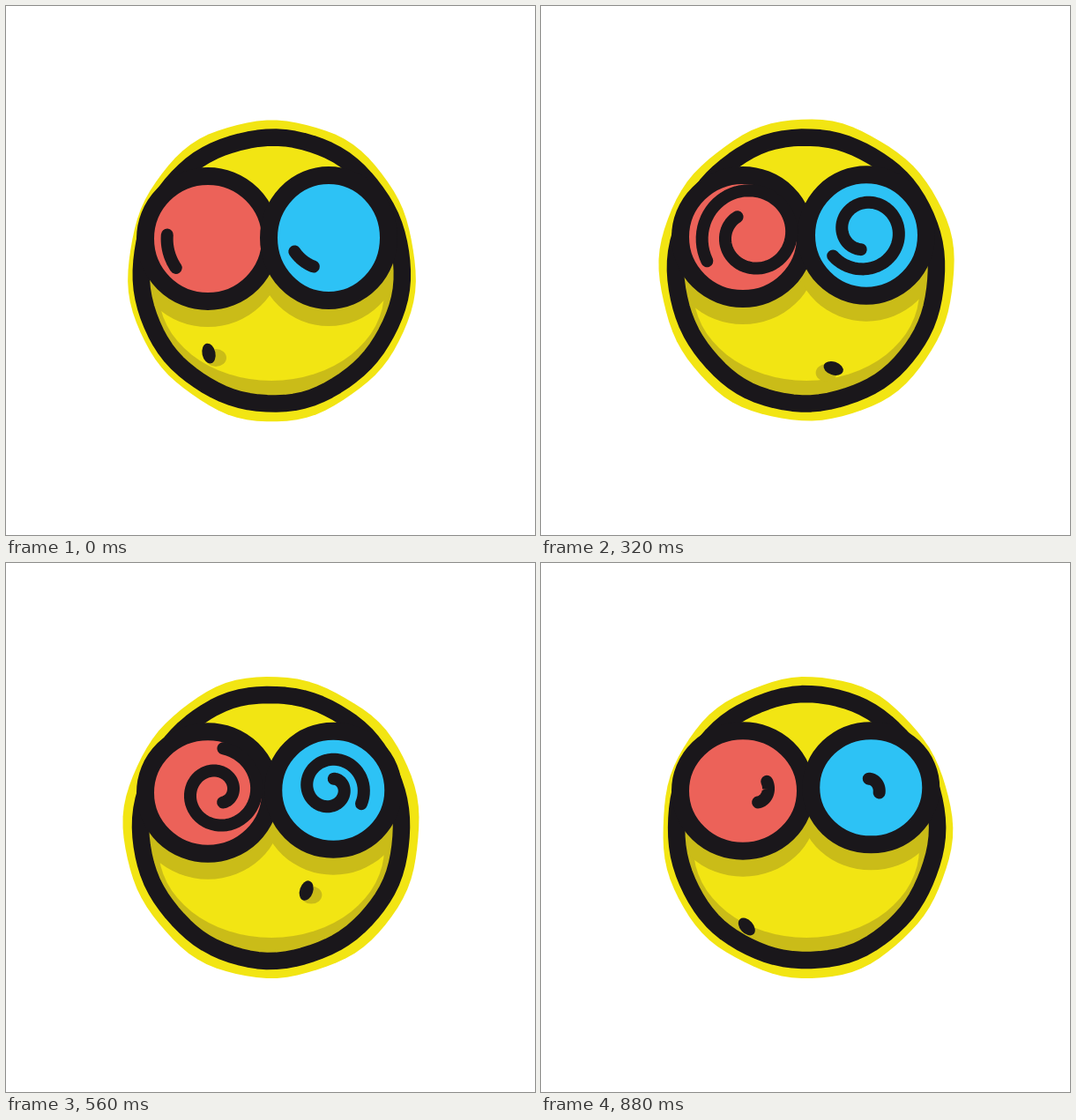
An HTML page with a canvas for the animation above (0.96 s loop, 600 by 600 pixels).

```html
<!DOCTYPE html>
<html lang="en">
<head>
<meta charset="utf-8">
<title>Dizzy face</title>
<style>
  html, body { margin: 0; width: 100%; height: 100%; overflow: hidden; background: #fff; }
  canvas { display: block; width: 600px; height: 600px; }
</style>
</head>
<body>
<canvas id="stage" width="600" height="600"></canvas>
<script>
const ctx = document.getElementById('stage').getContext('2d');
const STEP = 80, STEPS = 12, TAU = Math.PI * 2;
const INK = '#1a171b', YELLOW = '#f2e513', SHADE = '#cabc18', RED = '#ec6259', BLUE = '#2dc2f5';
const { sin, cos, min, max } = Math;
const radians = degrees => degrees * Math.PI / 180;

// Swirls run from the rim inwards; the sweep sign gives the direction.
const leftSwirl = { x: 240, y: 260, outer: 60, inner: 13, angle: 142, sweep: 640 };
const rightSwirl = { x: 368, y: 255, outer: 47, inner: 11, angle: 150, sweep: -580 };

function fill(color) {
  ctx.fillStyle = color;
  ctx.fill();
}

function stroke(width) {
  ctx.strokeStyle = INK;
  ctx.lineWidth = width;
  ctx.stroke();
}

function ellipse(x, y, rx, ry, tilt = 0) {
  ctx.beginPath();
  ctx.ellipse(x, y, rx, ry, tilt, 0, TAU);
}

// Ellipse with an uneven, hand-drawn edge.
function blob(x, y, rx, ry, rough, seed) {
  ctx.beginPath();
  for (let angle = 0; angle < TAU; angle += TAU / 90) {
    const bump = rough * (sin(5 * angle + seed * 2.4) + 0.6 * sin(11 * angle + seed * 4.1));
    ctx.lineTo(x + (rx + bump) * cos(angle), y + (ry + bump) * sin(angle));
  }
  ctx.closePath();
}

function drawSwirl({ x, y, outer, inner, angle, sweep }, from, to) {
  const parts = 80;
  ctx.beginPath();
  for (let i = 0; i <= parts; i++) {
    const t = from + (to - from) * i / parts;
    const radius = outer + (inner - outer) * t;
    const turn = radians(angle + sweep * t);
    ctx.lineTo(x + radius * cos(turn), y + radius * sin(turn));
  }
  stroke(14);
}

// The mouth wanders from side to side, bobs twice and turns once per loop.
function drawMouth(theta) {
  const x = 292 - 62 * cos(theta) + 10 * sin(theta);
  const y = 394 + 4 * cos(theta) - 20 * sin(2 * theta + 0.2);
  ellipse(x + 8 * cos(1.5 * theta), y + 5, 12, 10);
  fill(SHADE);
  ellipse(x, y, 11.5, 7.5, theta + radians(78));
  fill(INK);
}

function drawFace(step) {
  const progress = step / STEPS, theta = progress * TAU;
  const head = [301, 300, 148, 151];
  const eyes = [
    [229, 264 - 6 * progress, 71, 71 - 3 * progress],
    [366 + 9 * progress, 263 - 9 * progress, 68, 71 - 7 * progress]
  ];

  ctx.fillStyle = '#fff';
  ctx.fillRect(0, 0, 600, 600);
  blob(301.5, 300, 163 + 5 * sin(theta / 2), 171, 1, step);
  fill(YELLOW);

  // Lower face: a shaded rim, shadows below the eyes, and the mouth.
  ctx.save();
  ellipse(...head);
  ctx.clip();
  ctx.beginPath();
  ctx.rect(0, 285, 600, 315);
  ctx.clip();
  fill(SHADE);
  ellipse(301, 324, 128, 101);
  fill(YELLOW);
  for (const [x, y, rx, ry] of eyes) {
    ellipse(x, y + 20, rx + 13, ry + 9);
    fill(SHADE);
  }
  drawMouth(theta);
  ctx.restore();

  blob(...head, 0.5, step + 3);
  stroke(19.5);
  eyes.forEach((eye, i) => {
    ellipse(...eye);
    fill(i ? BLUE : RED);
    stroke(20);
  });

  // Each swirl winds in, then vanishes from its outer end.
  const from = max(0, (step - 3) / 8.7) ** 2;
  const to = min(1, 0.06 + 0.16 * step);
  drawSwirl(leftSwirl, from, to);
  drawSwirl(rightSwirl, from, to);
}

ctx.lineCap = ctx.lineJoin = 'round';
const start = performance.now();

function tick() {
  const elapsed = max(0, performance.now() - start);
  drawFace(Math.floor(elapsed / STEP) % STEPS);
  requestAnimationFrame(tick);
}
tick();
</script>
</body>
</html>
```
